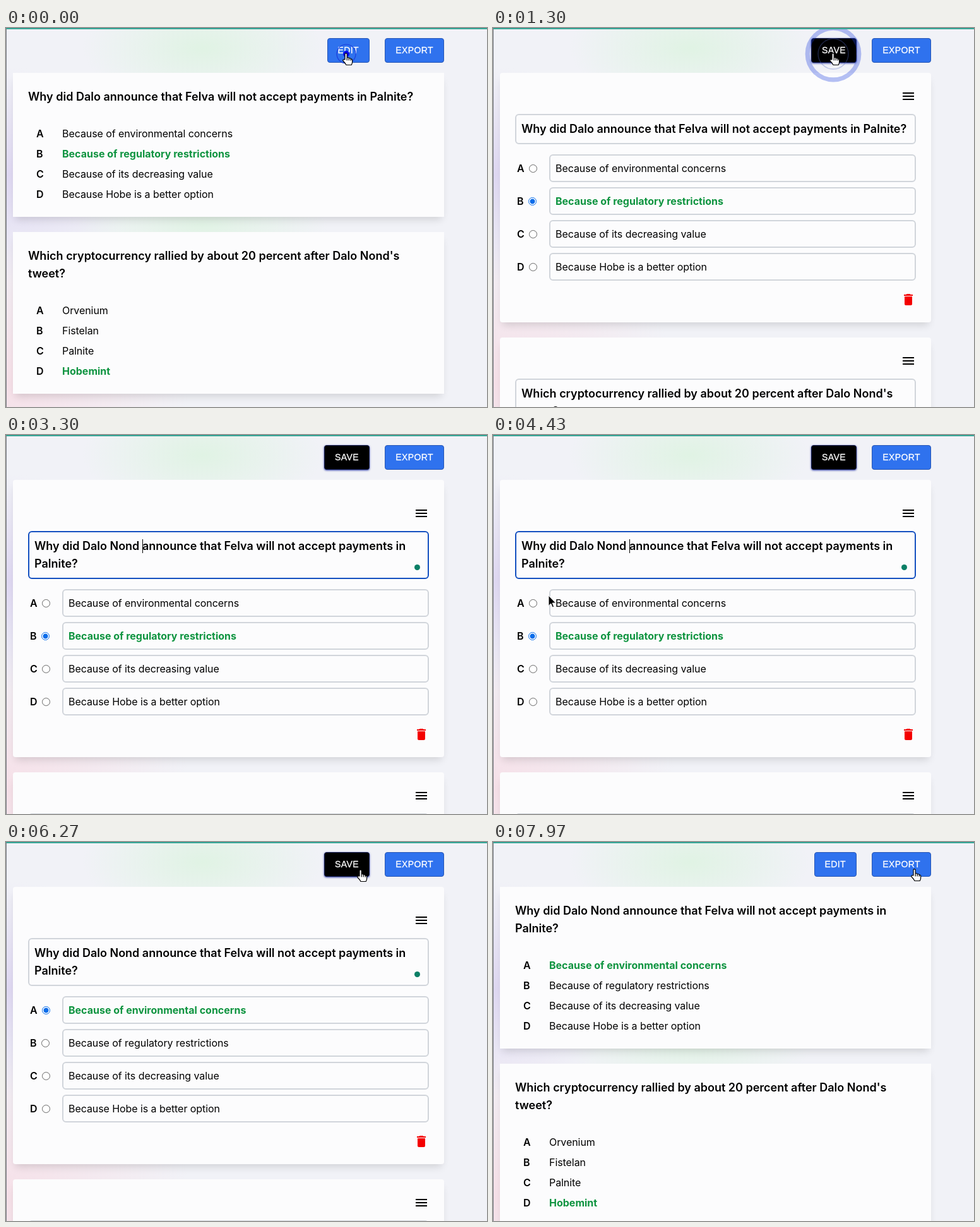
An HTML page for the animation above (8000 ms loop, 762 px wide and 600 px high).

```html
<!DOCTYPE html>
<html lang="en">
<head>
<meta charset="utf-8">
<title>Quiz editor</title>
<style>
  * { box-sizing: border-box; }
  html, body { margin: 0; width: 100%; height: 100%; overflow: hidden; }
  #stage {
    position: relative; width: 762px; height: 600px; overflow: hidden;
    border-left: 1px solid #7c8088; border-top: 2px solid #35a596;
    font: 16px/24px Inter, sans-serif; font-optical-sizing: none; color: #000; white-space: pre;
    background:
      radial-gradient(ellipse 190px 90px at 310px 30px, #e0f3e4, #e0f3e400),
      radial-gradient(ellipse 200px 90px at 310px 310px, #e1f3e5, #e1f3e500),
      radial-gradient(ellipse 210px 170px at 0 230px, #dfd8f2, #dfd8f200),
      radial-gradient(ellipse 290px 240px at 0 560px, #f6e0e8, #f6e0e800),
      #f1f2f7;
  }
  .button {
    position: absolute; top: 14px; height: 39px; padding: 0 16px;
    border: 1px solid #2857b4; border-radius: 4px; background: #2f72ee; color: #fff;
    font: 14px/37px "Liberation Sans", Arial, sans-serif; letter-spacing: .4px;
    -webkit-text-stroke: .3px #fff;
  }
  .button.save { background: #000; border-color: #10184a; box-shadow: 0 1px 3px #2a38a0; }
  #action { right: 186px; }
  #export { right: 68px; }
  #cards { position: absolute; left: 10px; top: 69px; width: 683px; }
  .card {
    position: relative; margin-bottom: 24px; padding: 24px 24px 20px;
    background: #fcfcfd; box-shadow: 0 8px 12px -4px #00000024;
  }
  .question { font-size: 18px; line-height: 28px; font-weight: 600; }
  .option { letter-spacing: -.07px; }
  .label { position: absolute; font-weight: 600; }
  .correct { color: #0f9440; font-weight: 700; letter-spacing: 0; }
  .view .question { margin-bottom: 28px; }
  .view .option { position: relative; height: 32px; line-height: 32px; padding-left: 54px; }
  .view .label { left: 13px; }
  .edit { padding: 65px 24px 66px; border-radius: 4px; }
  .edit.shifted { padding-top: 81px; }
  .box { position: relative; border: 2px solid #d1d5db; border-radius: 6px; padding: 8px; }
  .edit .question { margin-bottom: 16px; }
  .edit .question.focused { border-color: #1450c0; }
  .edit .option { position: relative; margin: 0 0 8px 54px; }
  .edit .option:last-of-type { margin-bottom: 0; }
  .edit .label { left: -53px; }
  .radio {
    position: absolute; left: -34px; top: 14px; width: 13px; height: 13px;
    border: 1px solid #666; border-radius: 50%; background: #fff;
  }
  .radio.on { border: 1.5px solid #0a6dea; background: radial-gradient(#0a6dea 3.7px, #fff 4.3px); }
  .icon { position: absolute; right: 24px; width: 24px; height: 24px; }
  .menu { top: 25px; }
  .shifted .menu { top: 41px; }
  .trash { bottom: 24px; fill: #f40000; }
  .status {
    position: absolute; right: 12.5px; bottom: 12.5px; width: 9px; height: 9px;
    border-radius: 50%; background: #0b7f66;
  }
  .caret {
    display: inline-block; width: 1px; height: 22px; margin-right: -1px;
    vertical-align: -5px; background: #000;
  }
  #overlay { position: absolute; left: -1px; top: -2px; }
</style>
</head>
<body>
<div id="stage">
  <div id="action" class="button"></div>
  <div id="export" class="button">EXPORT</div>
  <div id="cards"></div>
  <svg id="overlay" width="762" height="600">
    <g fill="none" stroke="#1c3cdc">
      <circle id="wave"/>
      <circle id="ring" stroke="#5468c0"/>
      <circle id="dot" fill="#0505ee" stroke="none"/>
    </g>
    <g id="pointer" stroke-linejoin="round" stroke-linecap="round">
      <path id="hand" fill="#fff" stroke="#000" stroke-width="1.2"
        d="M-2 9V.5a1.6 1.6 0 0 1 3.2 0V6q2.5-1 3 1 2.6-.8 3 1.2 2.4-.4 2.4 1.8v3q0 2-1.4 4.5H0q-1.5-3-5-6.5-.8-1.8 1-2.2zM1.2 6v4M4.2 7v3M7.2 8.2v2"/>
      <path id="arrow" fill="#000" stroke="#fff" d="M0 0v16l3.7-3.5 2.5 5.8 2.4-1-2.5-5.7h5.2z"/>
      <g id="beam" fill="none">
        <path id="beamEdge" stroke="#fff" stroke-width="3"/>
        <path id="beamCore" stroke="#000"/>
      </g>
    </g>
  </svg>
</div>
<script>
const LOOP = 8000, WAVE_TIME = 620;
const EDIT_AT = 800, FOCUS_AT = 2080, PICK_AT = 5160, SAVE_AT = 6840;
const NAME = 'Nond ', KEY_TIMES = [2580, 2970, 3080, 3190, 3295];

const FIRST = ['Because of environmental concerns', 'Because of regulatory restrictions',
  'Because of its decreasing value', 'Because Hobe is a better option'];
const SECOND = ['Orvenium', 'Fistelan', 'Palnite', 'Hobemint'];
const SECOND_QUESTION = "Which cryptocurrency rallied by about 20 percent after Dalo Nond's\ntweet?";

// Pointer stops: time, x, y, shape from then on
const STOPS = [
  [0, 539, 41, 'hand'], [1310, 539, 41, 'hand'], [1430, 470, 66, 'arrow'],
  [1690, 225, 138, 'beam'], [2000, 161, 174, 'beam'], [2570, 161, 174, ''],
  [3780, 161, 174, 'beam'], [4200, 120, 228, 'arrow'], [4600, 68, 271, 'arrow'],
  [4630, 68, 267, 'arrow'], [5240, 68, 267, 'arrow'], [5330, 89, 264, 'beam'],
  [5400, 116, 259, 'beam'], [5650, 330, 150, 'arrow'], [5880, 560, 54, 'hand'],
  [6200, 562, 45, 'hand'], [6320, 562, 45, 'hand'], [6500, 545, 41, 'hand'],
  [6950, 545, 41, 'hand'], [7080, 585, 60, 'arrow'], [7400, 684, 112, 'arrow'],
  [7630, 682, 110, 'arrow'], [7760, 672, 56, 'hand'], [7930, 668, 44, 'hand'],
  [LOOP, 668, 44, 'hand']
];
// Clicks: press time, release time, x, y
const CLICKS = [[0, EDIT_AT, 539, 41], [2070, 2110, 161, 174],
  [4800, PICK_AT, 68, 267], [6520, SAVE_AT, 545, 41]];

const BEAM = 'M-3.5-7.5q3.5 0 3.5 2v11q0 2-3.5 2M3.5-7.5q-3.5 0-3.5 2M0 5.5q0 2 3.5 2M-2 2h4';
const MENU = '<svg class="icon menu" viewBox="0 0 24 24"><path d="M3 18h18v-2H3zm0-5h18v-2H3zm0-7v2h18V6z"/></svg>';
const TRASH = '<svg class="icon trash" viewBox="0 0 24 24"><path d="M6 19c0 1.1.9 2 2 2h8c1.1 0 2-.9 2-2V7H6zM19 4h-3.5l-1-1h-5l-1 1H5v2h14z"/></svg>';

const el = id => document.getElementById(id);
const setAttrs = (id, attrs) => {
  for (const key in attrs) el(id).setAttribute(key, attrs[key]);
};

function card({ question, options, correct, editing, shifted, focused }) {
  const rows = options.map((text, i) => {
    const on = i === correct;
    const radio = editing
      ? `<i class="radio ${on ? 'on' : ''}" style="margin-left:${i === 1 ? -1 : 0}px"></i>` : '';
    return `<div class="option ${editing ? 'box' : ''}"><span class="label">${'ABCD'[i]}</span>${radio}` +
      `<span class="${on ? 'correct' : ''}">${text}</span></div>`;
  }).join('');
  const status = shifted ? '<i class="status"></i>' : '';
  return editing
    ? `<div class="card edit ${shifted ? 'shifted' : ''}">${MENU}` +
      `<div class="question box ${focused ? 'focused' : ''}">${question}${status}</div>${rows}${TRASH}</div>`
    : `<div class="card view"><div class="question">${question}</div>${rows}</div>`;
}

function caretVisible(t) {
  if (t < FOCUS_AT || t >= PICK_AT) return false;
  return t < 3770 || (t >= 4270 && t < 4770);
}

let shownPage = '';
function drawPage(t) {
  const editing = t >= EDIT_AT && t < SAVE_AT;
  const typed = NAME.slice(0, KEY_TIMES.filter(time => t >= time).length);
  const caret = caretVisible(t) ? '<i class="caret"></i>' : '';
  const question = `Why did Dalo ${typed}${caret}announce that Felva will not accept payments in` +
    `${typed ? '\n' : ' '}Palnite?`;
  const page =
    card({ question, options: FIRST, correct: t < PICK_AT ? 1 : 0, editing,
      shifted: editing && t >= FOCUS_AT, focused: t >= FOCUS_AT && t < PICK_AT }) +
    card({ question: SECOND_QUESTION, options: SECOND, correct: 3, editing });
  if (page === shownPage) return;
  shownPage = page;
  el('cards').innerHTML = page;
  el('action').textContent = editing ? 'SAVE' : 'EDIT';
  el('action').classList.toggle('save', editing);
}

function drawClick(t) {
  const click = CLICKS.find(([down, up]) => t >= down && t < up + WAVE_TIME);
  for (const id of ['wave', 'ring', 'dot']) el(id).style.display = click ? '' : 'none';
  if (!click) return;
  const [down, up, cx, cy] = click;
  const p = Math.max(0, (t - up) / WAVE_TIME);
  const late = Math.max(0, p - .4);
  setAttrs('wave', { cx, cy, r: 15 + 32 * p, 'stroke-width': 1.2 + 9 * p * p, opacity: Math.min(1, 1.65 * (1 - p)) });
  setAttrs('ring', { cx, cy, r: 15 + 22 * late, 'stroke-width': 1.5, opacity: p ? .75 - late : 0 });
  setAttrs('dot', { cx, cy, r: Math.max(0, Math.min(7, 5 + (t - down) / 70) - 35 * late) });
}

function drawPointer(t) {
  const i = STOPS.findIndex(stop => stop[0] > t) - 1;
  const [t0, x0, y0, shape] = STOPS[i], [t1, x1, y1] = STOPS[i + 1];
  const k = (t - t0) / (t1 - t0), ease = k * k * (3 - 2 * k);
  setAttrs('pointer', { transform: `translate(${x0 + (x1 - x0) * ease} ${y0 + (y1 - y0) * ease})` });
  for (const id of ['hand', 'arrow', 'beam']) el(id).style.display = id === shape ? '' : 'none';
}

setAttrs('beamEdge', { d: BEAM });
setAttrs('beamCore', { d: BEAM });

const start = performance.now();
function frame() {
  const t = (performance.now() - start) % LOOP;
  drawPage(t);
  drawClick(t);
  drawPointer(t);
  requestAnimationFrame(frame);
}
frame();
</script>
</body>
</html>
```
